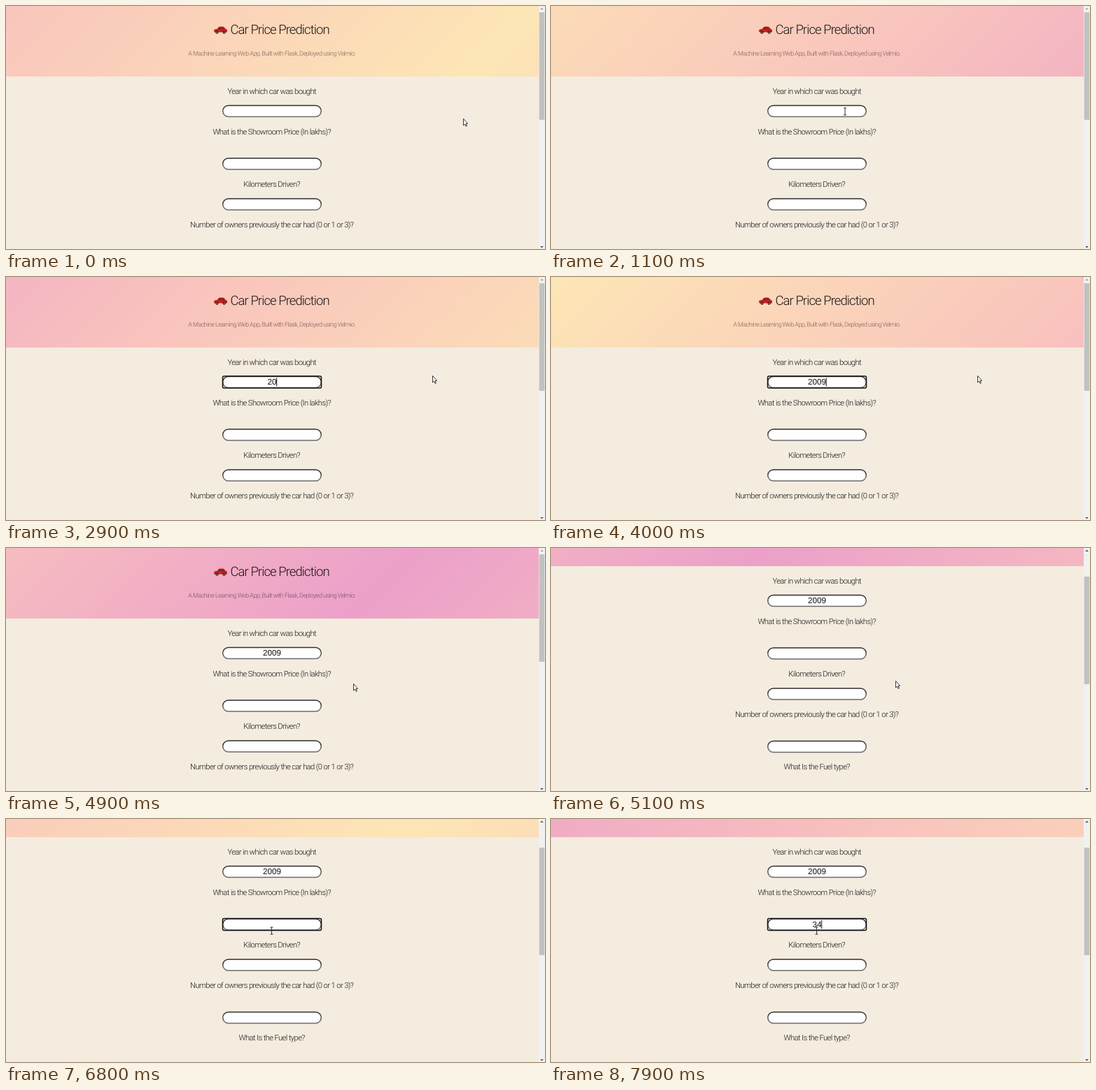
Animation of 770 by 348 pixels, one loop 8000 ms. Source, as an HTML page with a canvas:

```html
<!DOCTYPE html>
<html lang="en">
<head>
<meta charset="utf-8">
<title>Car Price Prediction</title>
<style>
  html, body { margin: 0; width: 100%; height: 100%; overflow: hidden; background: #f4ecdf; }
  canvas { display: block; }
</style>
</head>
<body>
<canvas id="stage" width="770" height="348"></canvas>
<script>
const ctx = document.getElementById('stage').getContext('2d');
const W = 770, H = 348, PAGE = 761, MID = 380, LOOP = 8000, STEP = 100;
const HEADER = 101, SCROLL = 75, BAND = 1520;
const HUES = ['#eca0c9', '#f9c5bd', '#fde6b5', '#f9c5bd'];

// [time, value...] keys
const drift = [[0, .5], [2000, 1.7], [4000, 3], [5100, 3.75], [6600, 4.65], [7900, 4.1], [8000, 4.05]];
const pointer = [
  [0, 653, 161], [200, 653, 161], [900, 420, 151], [1300, 420, 151], [1900, 609, 141],
  [4300, 609, 141], [4700, 500, 195], [4900, 496, 194], [5100, 492, 190],
  [5600, 486, 188], [6200, 379.5, 160], [8000, 379.5, 160]
];
const labels = [
  ['Year in which car was bought', 122],
  ['What is the Showroom Price (In lakhs)?', 180],
  ['Kilometers Driven?', 255],
  ['Number of owners previously the car had (0 or 1 or 3)?', 313],
  ['What Is the Fuel type?', 388]
];
const fields = [
  { y: 150.5, text: '2009', focus: 1200, blur: 4700, keys: [2500, 2800, 3000, 3600] },
  { y: 226, text: '34', focus: 6200, blur: LOOP, keys: [7300, 7600] },
  { y: 284, text: '', keys: [] },
  { y: 359.5, text: '', keys: [] }
];

const smooth = k => k * k * (3 - 2 * k);
const clamp = k => Math.max(0, Math.min(1, k));

function track(keys, t, ease = k => k) {
  const i = Math.max(1, keys.findIndex(k => k[0] >= t));
  const a = keys[i - 1], b = keys[i];
  const k = ease(clamp((t - a[0]) / (b[0] - a[0])));
  return a.slice(1).map((v, n) => v + (b[n + 1] - v) * k);
}

function shape(points, fill, stroke, width = 1) {
  ctx.beginPath();
  points.forEach(([x, y]) => ctx.lineTo(x, y));
  ctx.closePath();
  if (fill) { ctx.fillStyle = fill; ctx.fill(); }
  if (stroke) { ctx.strokeStyle = stroke; ctx.lineWidth = width; ctx.stroke(); }
}

function disc(x, y, r, fill) {
  ctx.beginPath();
  ctx.arc(x, y, r, 0, 7);
  ctx.fillStyle = fill;
  ctx.fill();
}

function write(text, x, y, font, color, spacing = 0) {
  ctx.font = font;
  ctx.letterSpacing = spacing + 'px';
  ctx.textAlign = 'center';
  ctx.textBaseline = 'alphabetic';
  ctx.fillStyle = color;
  ctx.fillText(text, x + spacing / 2, y);
}

function car(x, y) {
  ctx.save();
  ctx.translate(x, y);
  shape([[0, 6], [1, 4.6], [4.6, 3.8], [7, 1], [8.5, .4], [13, .4], [14.6, 1.2], [16.8, 3.8],
    [18.4, 4.4], [19, 6], [18.8, 8.6], [.4, 8.6]], '#c3201c');
  shape([[6, 3.8], [8, 1.5], [10, 1.5], [10, 3.8]], '#5d2a2a');
  shape([[11, 3.8], [11, 1.5], [13, 1.5], [15, 3.8]], '#5d2a2a');
  for (const wx of [4.4, 14.6]) {
    disc(wx, 8.6, 2.2, '#2b2020');
    disc(wx, 8.6, .9, '#a79a9a');
  }
  ctx.restore();
}

function header(t) {
  const off = track(drift, t)[0], count = 6;
  const a = -off * BAND / 2, b = (count - off) * BAND / 2;
  const g = ctx.createLinearGradient(a, a, b, b);
  for (let i = 0; i <= count * 2; i++) g.addColorStop(i / (count * 2), HUES[i % 4]);
  ctx.fillStyle = g;
  ctx.fillRect(0, 0, PAGE, HEADER);
  car(297, 29);
  write('Car Price Prediction', 391.5, 40, '300 18.5px Roboto, sans-serif', '#1c1718', -.92);
  write('A Machine Learning Web App, Built with Flask, Deployed using Velmio.', MID, 70.5,
    '300 9px Roboto, sans-serif', 'rgba(60,40,45,.66)', -.52);
}

function field(f, t) {
  const x = 309, w = 142, h = 17.5, y = f.y - h / 2;
  const focused = t >= f.focus && t < f.blur;
  ctx.beginPath();
  ctx.roundRect(x + .75, y + .75, w - 1.5, h - 1.5, 8);
  ctx.fillStyle = '#fff';
  ctx.fill();
  const g = ctx.createLinearGradient(0, y, 0, y + h);
  g.addColorStop(.3, '#2e2e2e');
  g.addColorStop(.8, '#6b6b6b');
  ctx.strokeStyle = g;
  ctx.lineWidth = 1.4;
  ctx.stroke();
  if (focused) {
    ctx.beginPath();
    ctx.roundRect(x + .5, y + .25, w - 1, h - .5, 2);
    ctx.strokeStyle = '#111';
    ctx.lineWidth = 1.5;
    ctx.stroke();
  }
  const typed = f.keys.filter(k => t >= k);
  const text = f.text.slice(0, typed.length);
  write(text, MID, f.y + 3.8, '11.7px "Liberation Sans", Arial, sans-serif', '#111');
  const since = t - (typed.length ? typed[typed.length - 1] : f.focus);
  if (focused && since % 1000 < 500) {
    ctx.fillRect(MID + ctx.measureText(text).width / 2 - .3, f.y - 6, 1, 12);
  }
}

function scrollbar(y) {
  ctx.fillStyle = '#f1f1f1';
  ctx.fillRect(PAGE, 0, W - PAGE, H);
  ctx.fillStyle = '#c1c1c1';
  ctx.fillRect(PAGE + .7, 9 + y * 32 / SCROLL, 7.6, 154);
  shape([[763.2, 5], [765.5, 2.5], [767.8, 5]], y > 0 ? '#505050' : '#a3a3a3');
  shape([[763.2, 344], [765.5, 346.5], [767.8, 344]], '#505050');
}

function cursor(t) {
  const [x, y] = track(pointer, t, smooth);
  const beam = (t >= 800 && t < 1500) || t >= 6100;
  ctx.save();
  ctx.translate(x, y);
  if (beam) {
    ctx.fillStyle = '#333';
    ctx.fillRect(-.5, -5, 1, 10);
    ctx.fillRect(-2, -5.5, 4, 1);
    ctx.fillRect(-2, 4.5, 4, 1);
  } else {
    shape([[.5, .5], [.5, 10], [2.6, 8.1], [4, 11.4], [5.4, 10.8], [4, 7.6], [6.6, 7.4]], '#fff', '#222', .9);
  }
  ctx.restore();
}

function draw(t) {
  const scroll = SCROLL * smooth(clamp((t - 4900) / 200));
  ctx.textRendering = 'geometricPrecision';
  ctx.fillStyle = '#f4ecdf';
  ctx.fillRect(0, 0, W, H);
  ctx.save();
  ctx.translate(0, -scroll);
  header(t);
  for (const [text, y] of labels) write(text, MID, y + 4, '300 11.2px Roboto, sans-serif', '#141414', -.6);
  fields.forEach(f => field(f, t));
  ctx.restore();
  scrollbar(scroll);
  cursor(t);
}

function tick(now) {
  draw(Math.floor(now % LOOP / STEP) * STEP);
  requestAnimationFrame(tick);
}
draw(0);
requestAnimationFrame(tick);
</script>
</body>
</html>
```
